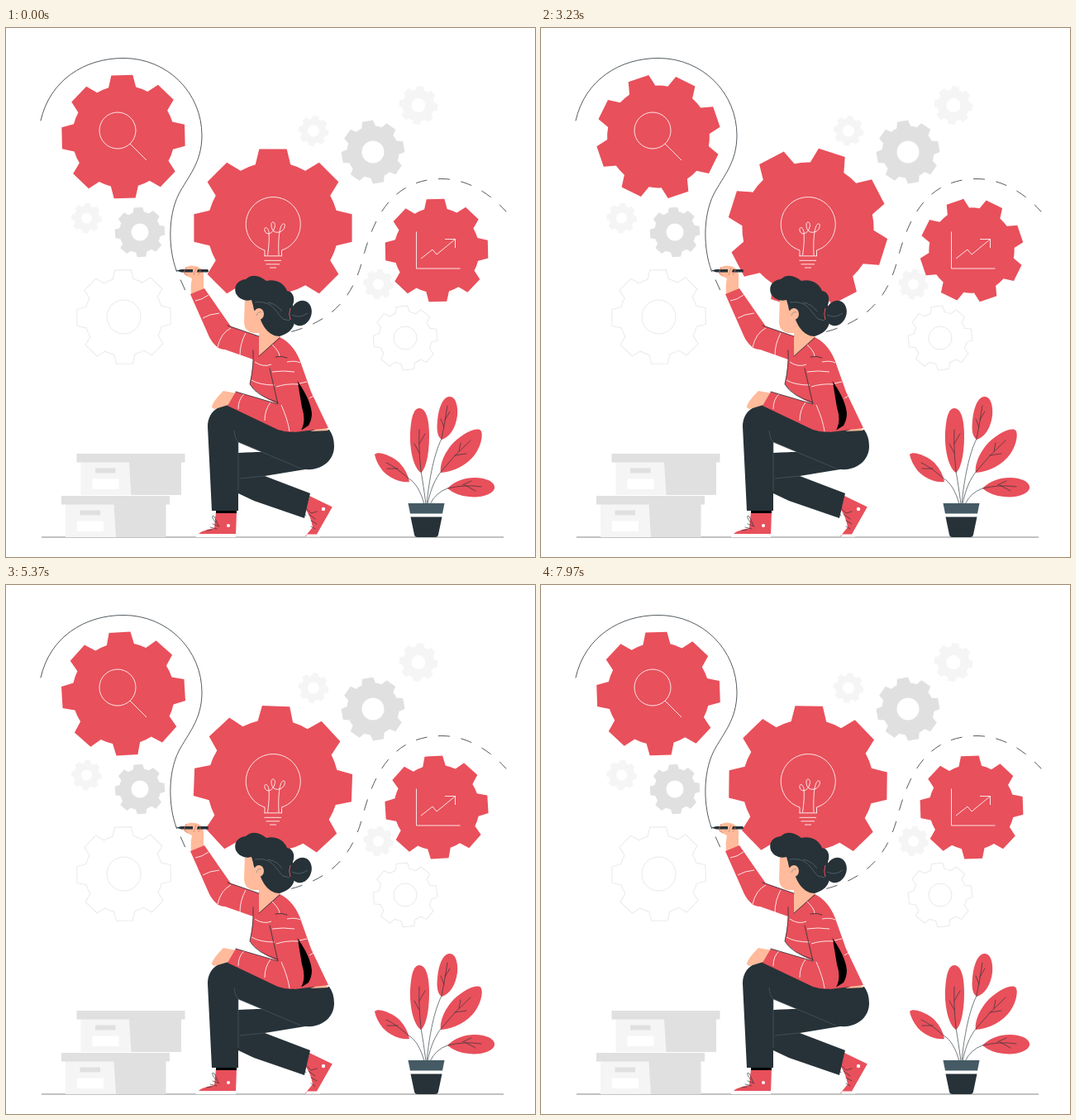
These frames come from a looping animation (640x640 px, 8 s). An HTML page:

```html
<!DOCTYPE html>
<html lang="en">
<head>
<meta charset="utf-8">
<title>Turning gears</title>
<style>
  html, body { margin: 0; height: 100%; overflow: hidden; background: #fff; }
  svg { display: block; width: 100vw; height: 100vh; }
  .red { fill: #e8505b; }
  .dark { fill: #263238; }
  .skin { fill: #ffbb9b; }
  .mid { fill: #e0e0e0; }
  .pale { fill: #f5f5f5; }
  .white { fill: #fff; }
  .line { fill: none; stroke: #263238; stroke-width: .8; stroke-linecap: round; }
  .chalk { fill: none; stroke: #fff; stroke-width: .85; stroke-linejoin: round; }
  .thin { stroke-width: .65; }
  .faint { fill: none; stroke: #e9e9e9; stroke-width: 1; }
</style>
</head>
<body>
<svg viewBox="0 0 640 640">
  <g id="still"></g>
  <g id="turning"></g>

  <!-- icons on the gears -->
  <g class="chalk">
    <circle cx="135" cy="124" r="22"/>
    <path d="M150 140l3 3M152 142l18 18"/>
    <path d="M313 276V268.900A33 33 0 1 1 333.500 268.900V276"/>
    <path d="M312.500 275.800H334M312.500 281.300H333M314.500 285.800H331M319 290H327"/>
    <path d="M316.500 275Q319 258 318 247C317 240 312 240 313 245C314 251 323 250 325 241C327 234 321 233 321 238C321 246 326 248 330 247C338 246 339 235 335 237C331 239 329 255 330 275"/>
    <path d="M496.500 246.500V291H549.500M502 279L516 268L521 274L543.500 255.500M531 255.500H543.500V266"/>
  </g>

  <!-- drawn line and its dashed continuation -->
  <path class="line" d="M42 112C53 63 95 36.500 142 36.500C196 36.500 237 79 237 130C237 163 220 180 209 201C195 229 197 269 206 293"/>
  <path class="line" stroke-dasharray="13 11" stroke-dashoffset="-13" d="M206 293L218 320"/>
  <path class="line" stroke-dasharray="13 14.500" stroke-dashoffset="2" d="M605 222C587 202 560 182.500 527 182.500C463 183 443 235 430 285C418 327 394 355 343 368"/>

  <path d="M43 616H602" stroke="#777" stroke-width=".9"/>
  <g id="boxes"></g>

  <!-- plant -->
  <g class="red">
    <path d="M446 516C450 511 466 517 476 526Q486 537 488 549C478 551 463 544 456 536Q448 526 446 516Z"/>
    <path d="M500 460C509 460 512 476 512 494C512 515 508 534 502 538C493 533 488 509 489 490C490 472 493 460 500 460Z"/>
    <path d="M536 446C544 445 547 457 546 469C544 484 537 495 527 498C520 493 521 480 523 467C526 453 530 447 536 446Z"/>
    <path d="M573 486C578 488 576 503 568 515C559 528 542 537 526 538C524 529 531 512 542 501C554 490 567 484 573 486Z"/>
    <path d="M534 557C545 546 562 542 577 545C587 547 592 552 591 557C589 564 574 569 560 567Q545 566 534 557Z"/>
  </g>
  <g class="line thin">
    <path d="M506 576C502 561 495 549 487 545Q470 530 460 526M474 533L461 533"/>
    <path d="M508 576Q505 553 502 536Q499 508 500 486M500 514L494 503M500 503L507 491"/>
    <path d="M509 576C512 545 518 515 527 497Q531 477 534 457M530 483L526 473M531 474L537 464"/>
    <path d="M510 576C514 556 520 545 526 537Q544 515 562 499M543 517L557 515M548 512L550 502"/>
    <path d="M513 576Q520 562 534 557Q555 552 575 555M552 553L563 548M555 553L568 560"/>
  </g>
  <path fill="#455a64" d="M486.500 575H530.500L528 587.500H489Z"/>
  <path class="dark" d="M489.500 591.500H527.500L523 613Q522.500 616 519 616H498Q494.500 616 494 613Z"/>

  <!-- legs and shoes -->
  <path class="red" d="M367 566L396 580L377 615H362L371 604Q369 592 363 583Z"/>
  <path class="white" d="M395 579L398 581L380 615.500H363L364 612.500H376Z"/>
  <circle class="white" cx="384" cy="582" r="2.200"/>
  <path class="dark" d="M281 513H340L368 533L313 542L368 563L361 593L300 572L281 563Z"/>
  <path class="white" d="M281 501L332 509.500Q320 512.500 281 514Z"/>
  <path class="red" d="M254 585H279L278 614H231Q235 608 252 605Z"/>
  <path class="white" d="M231 612H278V616H230Z"/>
  <circle class="white" cx="269" cy="602" r="2"/>
  <path d="M254 583H279V587H254Z"/>
  <path class="line thin" d="M243 608L249 607M247 604L255 606M250 600L258 603M254 599Q246 588 252 591L257 602M363 590Q358 585 362 580L369 587L376 585M366 588L374 594M369 596L376 600M369 603L374 606"/>
  <path class="dark" d="M268 456C255 457 244 466 244 482L249 584H281V501L357 533C377 538 397 526 397 506Q397 494 391 486L344 486Z"/>
  <path d="M276 487Q277 497 281 501V560M281 501L357 533M283 545L313 542" fill="none" stroke="#526168" stroke-width=".6"/>

  <!-- body -->
  <path class="skin" d="M386 482L390 487L368 488ZM249 459Q249 453 263 439L279 442L269 456L252 461Z"/>
  <path class="skin" d="M289 325L288 357Q289 367 299 369L306 369V398L332 375L325 330L301 322Z"/>
  <path class="skin" d="M216 291Q221 286 229 288Q238 290 239 298L239 316L224 323Q223 311 225 303L219 300Q214 298 215 294Z"/>
  <path class="red" d="M223 322L240 315L272 361L306 373V397L331 374Q350 383 358 409L369 440L390 484L349 489L329 455Q304 444 295 431Q298 416 299 401L265 389Q254 389 246 374Z"/>
  <path d="M351 425Q368 448 370 466Q370 474 366 481L358 486L346 480Z"/>
  <path class="red" d="M278 440L329 455L321 414Q324 397 336 397Q347 399 351 417L358 459Q363 474 358 485Q348 492 329 486L268 457Z"/>
  <g class="chalk">
    <path d="M229 330Q237 329 245 323M238 351Q246 346 258 345M256 386Q260 369 272 363M283 396Q283 382 290 369M301 404Q311 411 321 407M297 426Q307 432 325 432M322 383Q331 392 331 397M340 404Q350 402 356 405M322 416Q335 414 349 416M327 434Q339 430 354 431M313 475Q313 462 320 453M281 461Q281 449 288 443M343 488Q341 474 333 456M355 430L364 428M367 448L372 445"/>
  </g>
  <path class="line" d="M278 440L329 455L319 412M299 390Q300 410 295 431Q303 445 329 453M326 398Q333 396 340 399M268 360L306 373M306 397L331 375"/>

  <!-- hair and head -->
  <path class="dark" d="M278 321C275 311 281 305 290 304C297 297 307 299 315 306C326 303 337 309 340 318C348 319 350 328 347 335L349 350Q351 367 331 373C318 373 310 360 307 350L300 341Q299 335 297 329Q284 332 278 321Z"/>
  <ellipse class="dark" cx="357" cy="345" rx="12.500" ry="15.500" transform="rotate(18 357 345)"/>
  <path d="M344 339Q341.500 346 344 353" fill="none" stroke="#e8505b"/>
  <ellipse class="skin" cx="306" cy="346" rx="6" ry="7"/>
  <path d="M303 348Q305 342 309 344M301 332C322 329 326 343 335 352L343 354M317 332Q328 334 334 343M346 347Q355 352 365 345" fill="none" stroke="#687780" stroke-width=".6"/>

  <!-- pen -->
  <path d="M206 293.500L212 292H244Q246 294 244 295.500H212Z" class="dark"/>
  <path class="skin" d="M226 288L233 289L230 298Q227 301 226 298Z"/>
  <path d="M218 289L215 296L220 300M230 290L227 299M232 299Q236 296 235 291" fill="none" stroke="#d97960" stroke-width=".7"/>
</svg>
<script>
const SVG_NS = "http://www.w3.org/2000/svg";

function add(parent, tag, attributes) {
  const node = document.createElementNS(SVG_NS, tag);
  for (const [name, value] of Object.entries(attributes)) node.setAttribute(name, value);
  return document.getElementById(parent).appendChild(node);
}

function gearPath(radius) {
  const inner = radius * .82;
  const at = (degrees, r) => {
    const a = degrees * Math.PI / 180;
    return `${(r * Math.sin(a)).toFixed(2)} ${(-r * Math.cos(a)).toFixed(2)}`;
  };
  let d = "";
  for (let a = 0; a < 360; a += 45) {
    d += d ? `A${inner} ${inner} 0 0 1 ` : "M";
    d += `${at(a - 15.5, inner)}L${at(a - 9.9, radius)}L${at(a + 9.9, radius)}L${at(a + 15.5, inner)}`;
  }
  return d + `A${inner} ${inner} 0 0 1 ${at(-15.5, inner)}Z`;
}

// Resting gears: x, y, radius, hole radius, angle, style.
[
  [97.5, 230, 18.5, 6.5, 5, "pale"],
  [162, 247, 30.5, 10.5, -4, "mid"],
  [372, 124.5, 18.5, 7, 8, "pale"],
  [444, 150, 38.5, 13.5, -10, "mid"],
  [499, 93.5, 23.5, 8.5, 6, "pale"],
  [450.5, 310, 18.5, 6.5, 8, "pale"],
  [142.5, 349.5, 57.5, 20.5, -1, "faint"],
  [483, 375, 39, 14, -6, "faint"],
].forEach(([x, y, radius, hole, angle, style]) => {
  add("still", "path", { d: gearPath(radius), class: style, transform: `translate(${x} ${y}) rotate(${angle})` });
  add("still", "circle", { cx: x, cy: y, r: hole, class: style === "faint" ? "faint" : "white" });
});

const gears = [
  { x: 142, y: 131.5, radius: 75.5, direction: 1, rest: -1.3 },
  { x: 323, y: 242, radius: 97, direction: -1, rest: 0 },
  { x: 521, y: 269, radius: 63, direction: 1, rest: -1.3 },
].map(gear => ({ ...gear, node: add("turning", "path", { d: gearPath(gear.radius), class: "red" }) }));

function drawBox(x, y) {
  const part = (d, style) => add("boxes", "path", { d, class: style, transform: `translate(${x} ${y})` });
  part("M5 10H68V50H5Z", "pale");
  part("M63.500 10H126.500V50H66Z", "mid");
  part("M0 0H131V10.500H0Z", "mid");
  part("M22.500 17.500H47V23.500H22.500Z", "mid");
  part("M19 30.500H51V43H19Z", "white");
}
drawBox(67, 566);
drawBox(85.5, 515);

// Half a turn every four seconds: seconds, degrees, degrees per second.
const turn = [
  [0, 0, 4], [.6, 8.6, 28], [1.48, 52.2, 58], [2.04, 85.5, 66],
  [3.14, 159.5, 52], [3.92, 179.3, 8], [4, 180, 4],
];

function angleAt(seconds) {
  const t = seconds % 4;
  const i = turn.findIndex(key => key[0] > t);
  const [t0, a0, v0] = turn[i - 1], [t1, a1, v1] = turn[i];
  const span = t1 - t0, u = (t - t0) / span, w = 1 - u;
  return a0 * w * w * (1 + 2 * u) + a1 * u * u * (3 - 2 * u) + span * u * w * (v0 * w - v1 * u);
}

// The motion advances at 25 steps a second, shown on a 30 Hz grid.
function stepSeconds(ms) {
  const tick = Math.floor(ms * .03 + .15);
  return Math.max(0, Math.floor((5 * tick - 4) / 6)) / 25;
}

function draw() {
  const angle = angleAt(stepSeconds(performance.now() % 8000));
  for (const { x, y, direction, rest, node } of gears) {
    node.setAttribute("transform", `translate(${x} ${y}) rotate(${rest + direction * angle})`);
  }
  requestAnimationFrame(draw);
}
draw();
</script>
</body>
</html>
```
